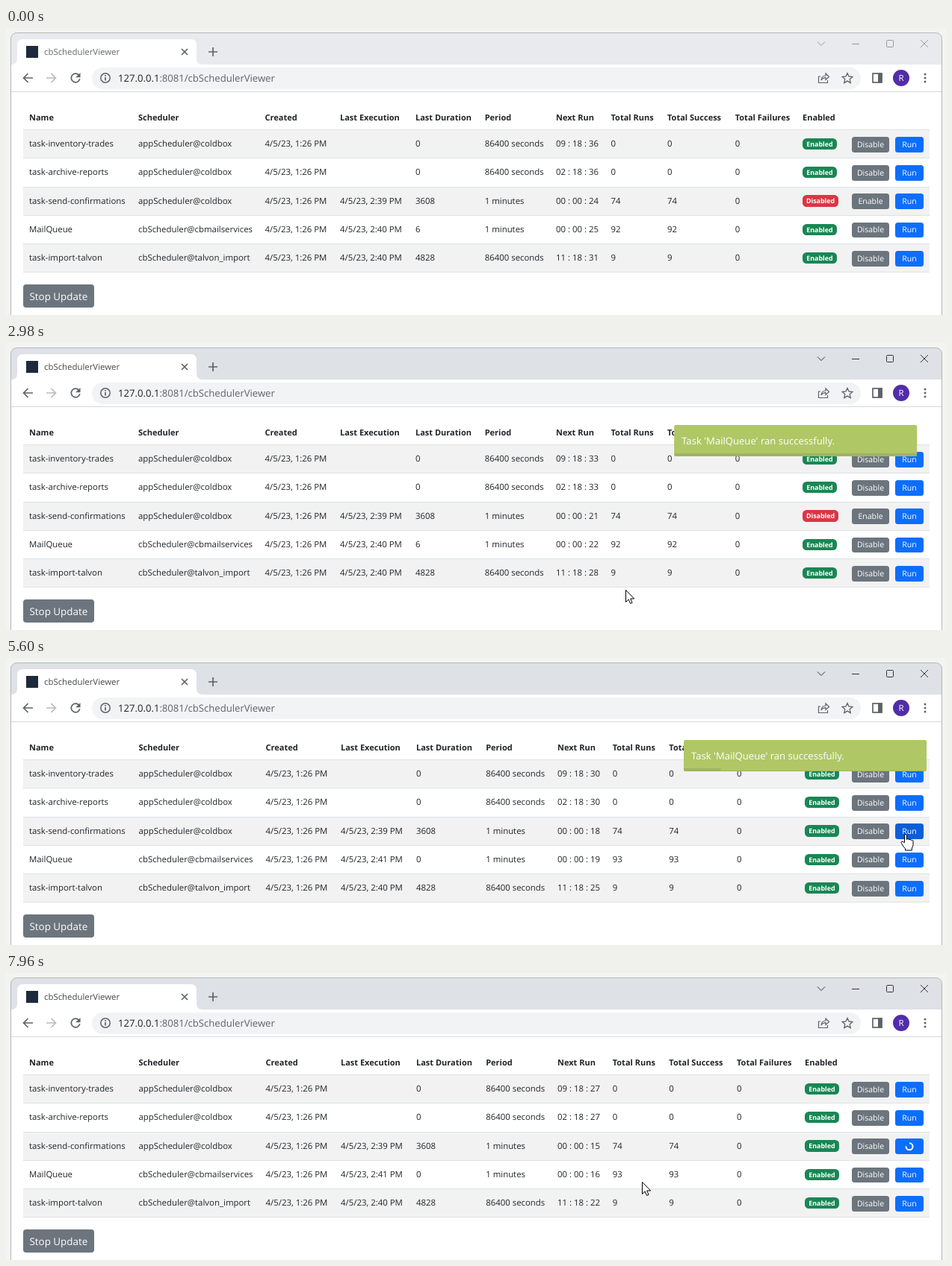
Write an HTML page that moves like this. It is 1258 px wide and 385 px high and loops after 8000 ms.

```html
<!DOCTYPE html>
<html lang="en">
<head>
<meta charset="utf-8">
<title>cbSchedulerViewer</title>
<style>
  html, body { margin: 0; width: 100%; height: 100%; overflow: hidden; background: #f3f3f1; }
  svg { display: block; }
  text { font: 11.4px "Open Sans", "Noto Sans", sans-serif; fill: #212529; white-space: pre; text-rendering: geometricPrecision; }
  .head { font-size: 11px; font-weight: 700; }
  .btn { font-size: 10.5px; fill: #fff; text-anchor: middle; }
  .badge { font-size: 8.9px; font-weight: 700; fill: #fff; text-anchor: middle; }
  .icon { fill: none; stroke: #5f6368; stroke-width: 1.7; }
  .thin { fill: none; stroke-width: 1; }
</style>
</head>
<body>
<svg width="1258" height="385" viewBox="0 0 1258 385">
  <defs><clipPath id="page"><rect x="7" y="86" width="1245" height="299"/></clipPath></defs>

  <rect id="win" x="6.5" y="6.5" width="1246" height="420" rx="8" stroke="#b5b6b8"/>
  <path d="M7 49q8 0 8-8V23q0-8 8-8H247q8 0 8 8V41q0 8 8 8Z" fill="#fff"/>
  <rect x="7" y="49" width="1245" height="336" fill="#fff"/>
  <rect x="27" y="24" width="16" height="16" fill="#1d2a3c"/>
  <text id="title" x="51" y="36">cbSchedulerViewer</text>
  <path class="icon" d="M235 28l8 8m0-8l-8 8" stroke-width="1.5"/>
  <path class="icon" d="M271 32h12m-6-6v12"/>
  <g id="controls" class="thin">
    <path d="M1086 18.500l5 5 5-5M1132 21.500h10M1224 16l10 10m0-10l-10 10"/>
    <rect x="1178.500" y="16.500" width="9" height="9" rx="1"/>
  </g>

  <path class="icon" d="M36 67H23.500m6-6l-6 6 6 6"/>
  <path class="icon" d="M54 67h12.500m-6-6l6 6-6 6" style="stroke:#b9bbbe"/>
  <path class="icon" d="M97.500 63.200a5.800 5.800 0 1 0 1.300 5"/>
  <path d="M99.500 60v6.300h-6.300z" fill="#5f6368"/>
  <rect x="115" y="53" width="1029" height="29" rx="14.500" fill="#f1f3f4"/>
  <circle class="icon" cx="133" cy="67" r="6.200" style="stroke-width:1.500"/>
  <path class="icon" d="M133 66v4.500M133 63v1.700"/>
  <text x="150" y="72" style="font-size:13.1px;fill:#5f6368"><tspan fill="#202124">127.0.0.1</tspan>:8081/cbSchedulerViewer</text>
  <path class="icon" style="stroke-width:1.200" d="M1090 65h-2.500v8.500h12V70M1091 70q.5-6 6-6v-3l4.500 4.500-4.500 4v-2.800q-4 0-6 3.300z"/>
  <path class="icon" style="stroke-width:1.300" d="M1126 60.500l2 4.500 4.800.5-3.600 3.300 1 4.800-4.200-2.500-4.200 2.500 1-4.800-3.600-3.300 4.800-.5z"/>
  <rect class="icon" x="1160" y="61" width="12" height="12"/>
  <rect x="1167" y="60.500" width="5.500" height="13" fill="#5f6368"/>
  <circle cx="1198" cy="67" r="11" fill="#512da8"/>
  <text x="1198" y="71" style="fill:#fff;text-anchor:middle">R</text>
  <g fill="#5f6368"><circle cx="1230" cy="62" r="1.500"/><circle cx="1230" cy="67" r="1.500"/><circle cx="1230" cy="72" r="1.500"/></g>
  <path d="M7 85.500H1252" stroke="#d6d8db"/>

  <g id="table"></g>
  <g id="spin" fill="none" stroke="#fff" stroke-width="2"><circle r="4.500" stroke-dasharray="21.200 7.070"/></g>
  <rect x="23" y="344" width="95" height="31" rx="4" fill="#6c757d"/>
  <text x="31.500" y="365" style="font-size:13.4px;fill:#fff">Stop Update</text>

  <g clip-path="url(#page)">
    <g id="toast">
      <rect y="110" width="325" height="42" rx="2" fill="#afc765"/>
      <path d="M1 151.500H324" stroke="#a0b55c"/>
      <rect id="bar" y="148" height="3" fill="#646464" opacity=".2"/>
      <text x="10" y="136" style="font-size:13.1px;fill:#fff">Task 'MailQueue' ran successfully.</text>
    </g>
  </g>

  <g id="cursor" fill="#fff" stroke="#000" stroke-linejoin="round">
    <path id="arrow" d="M.5.5V16.500L4.200 13l2.400 5.500 2.500-1.100L6.700 12h5z"/>
    <path id="hand" d="M-1.500 11.500V2q0-1.500 1.500-1.500T1.500 2V7.500Q1.700 6.500 3 6.500T4.500 8Q4.800 7.300 6 7.300T7.300 8.800Q7.600 8.300 8.500 8.300 10 8.300 10 10V14.500Q10 17 8.300 19V22H-.500V19.500Q-2.500 18-3.500 16L-5.600 12.500Q-6.500 11-5.200 10.300T-2.800 11.200Z"/>
  </g>
</svg>
<script>
const $ = id => document.getElementById(id);
const LOOP = 8000;

// bursts of screen updates: start, end, steps
const BURSTS = [
  [250, 990, 10], [1650, 1980, 5], [2150, 2900, 10], [2980, 3730, 10], [3810, 4550, 10],
  [4630, 5430, 11], [5510, 6240, 10], [6320, 6660, 5], [6830, 7560, 10], [7640, 7960, 5]
];
const TICKS = [740, 1730, 2640, 3550, 4630, 5430, 6320, 6650, 7640];
const PATH = [
  [250, 1203, 368], [600, 1186, 290], [900, 1155, 248], [1650, 1155, 248], [1950, 1208, 268],
  [2230, 1208, 268], [2700, 829, 331], [2980, 829, 331], [3640, 1088, 262], [3900, 1160, 238],
  [4720, 1160, 238], [5200, 1204, 236], [5600, 1204, 236], [5850, 1206, 269],
  [6200, 1209, 238], [6830, 1209, 238], [7300, 848, 286], [7500, 851, 280]
];
const ACTIVE = 2150, RAN = 2550, POLLED = 3550, ENABLED = 4630, RERUN = 6830;
const OPEN = 500, SHOWN = 3000;

const HEADS = ["Name", "Scheduler", "Created", "Last Execution", "Last Duration", "Period",
  "Next Run", "Total Runs", "Total Success", "Total Failures", "Enabled"];
const COLS = [31, 177, 346.5, 447, 548, 640.7, 736, 809.5, 885, 975.7, 1066];
const WIDER = [31, 177.5, 347.5, 448, 549, 642.2, 738, 811.7, 887.3, 978, 1069];
const RUN = { x: 1190, w: 38 }, TOGGLE = { x: 1132, w: 50 };
const BTN_TOP = 9.8, BTN_H = 20.8;

const rowY = i => 136 + 38.25 * i;
const text = (x, y, s, cls = "") => `<text x="${x}" y="${Math.round(y)}" class="${cls}">${s}</text>`;

// top and bottom edges fall on whole pixels
function box(x, y, w, h, r, fill) {
  const top = Math.round(y);
  return `<rect x="${x}" y="${top}" width="${w}" height="${Math.round(y + h) - top}" rx="${r}" fill="${fill}"/>`;
}

function snap(t) {
  let s = 0;
  for (const [a, b, n] of BURSTS) {
    if (t < a) break;
    const d = (b - a) / (n - 1);
    s = a + Math.min(n - 1, Math.floor((t - a) / d + 0.15)) * d;
  }
  return s;
}

// cubic-bezier(.68, -.55, .265, 1.55)
function backEase(p) {
  if (p <= 0) return 0;
  if (p >= 1) return 1;
  const curve = (s, a, b) => 3 * (1 - s) * (1 - s) * s * a + 3 * (1 - s) * s * s * b + s * s * s;
  let lo = 0, hi = 1;
  for (let i = 0; i < 24; i++) {
    const m = (lo + hi) / 2;
    if (curve(m, 0.68, 0.265) < p) lo = m; else hi = m;
  }
  return curve(lo, -0.55, 1.55);
}

function pointer(t) {
  const i = PATH.findIndex(k => k[0] > t);
  if (i < 0) return PATH[PATH.length - 1].slice(1);
  if (!i) return null;
  const [t0, x0, y0] = PATH[i - 1], [t1, x1, y1] = PATH[i];
  const p = (t - t0) / (t1 - t0), e = p * p * (3 - 2 * p);
  return [x0 + (x1 - x0) * e, y0 + (y1 - y0) * e];
}

function hit(pos) {
  if (!pos) return "";
  const [x, y] = pos;
  for (let i = 0; i < 5; i++) {
    const dy = y - rowY(i) - BTN_TOP;
    if (dy < 0 || dy > BTN_H) continue;
    if (x >= RUN.x && x <= RUN.x + RUN.w) return "run" + i;
    if (x >= TOGGLE.x && x <= TOGGLE.x + TOGGLE.w) return "toggle" + i;
  }
  return "";
}

function rows(k, polled) {
  const at = (h, m, s) => [h, m, String(s).padStart(2, "0")].join(" : ");
  const app = "appScheduler@coldbox", day = "86400 seconds", min = "1 minutes";
  const runs = polled ? 93 : 92;
  return [
    ["task-inventory-trades", app, "", 0, day, at("09", "18", 36 - k), 0],
    ["task-archive-reports", app, "", 0, day, at("02", "18", 36 - k), 0],
    ["task-send-confirmations", app, "4/5/23, 2:39 PM", 3608, min, at("00", "00", 24 - k), 74],
    ["MailQueue", "cbScheduler@cbmailservices", polled ? "4/5/23, 2:41 PM" : "4/5/23, 2:40 PM",
      polled ? 0 : 6, min, at("00", "00", k === 1 ? 23 : 25 - k), runs],
    ["task-import-talvon", "cbScheduler@talvon_import", "4/5/23, 2:40 PM", 4828, day, at("11", "18", 31 - k), 9]
  ];
}

function table(k, polled, enabled, over, busy) {
  const cols = enabled ? WIDER : COLS;
  let out = HEADS.map((h, c) => text(cols[c], 124, h, "head")).join("");
  rows(k, polled).forEach(([name, sched, last, dur, period, next, runs], i) => {
    const y = rowY(i), on = i !== 2 || enabled;
    if (i % 2 === 0) out += box(23, y, 1213, 38.25, 0, "#f2f2f2");
    [name, sched, "4/5/23, 1:26 PM", last, dur, period, next, runs, runs, 0]
      .forEach((s, c) => { out += text(cols[c], y + 23, s); });
    const w = on ? 46 : 48;
    out += box(cols[10], y + 11.8, w, 15.3, 5.5, on ? "#198754" : "#dc3545");
    out += text(cols[10] + w / 2, y + 22.8, on ? "Enabled" : "Disabled", "badge");
    out += box(TOGGLE.x, y + BTN_TOP, TOGGLE.w, BTN_H, 3.5, over === "toggle" + i ? "#5c636a" : "#6c757d");
    out += text(1157, y + 23.7, on ? "Disable" : "Enable", "btn");
    out += box(RUN.x, y + BTN_TOP, RUN.w, BTN_H, 3.5, over === "run" + i && busy !== i ? "#0b5ed7" : "#0d6efd");
    if (busy !== i) out += text(1209, y + 23.7, "Run", "btn");
  });
  for (let i = 0; i < 6; i++) out += box(23, rowY(i), 1213, 1, 0, "#dee2e6");
  return out;
}

let shown = "";
function draw(time) {
  const t = snap(time);
  const active = t >= ACTIVE, polled = t >= POLLED, enabled = t >= ENABLED;
  const k = TICKS.filter(x => x <= t).length;
  const pos = pointer(t), over = hit(pos);
  const busy = t >= RERUN ? 2 : t >= ACTIVE && t < RAN ? 3 : -1;

  const key = [k, polled, enabled, over, busy].join();
  if (key !== shown) {
    shown = key;
    $("table").innerHTML = table(k, polled, enabled, over, busy);
  }

  $("win").setAttribute("fill", active ? "#dee1e6" : "#e8eaed");
  $("title").style.fill = active ? "#45474a" : "#65686c";
  $("controls").setAttribute("stroke", active ? "#333" : "#999");

  $("spin").style.display = busy < 0 ? "none" : "";
  $("spin").setAttribute("transform", `translate(1209 ${rowY(busy) + 20.3}) rotate(${270 + (t - 7960) / 750 * 360})`);

  const closing = t - RAN - OPEN - SHOWN;
  const e = closing > 0 ? 1 - backEase(closing / OPEN) : backEase((t - RAN) / OPEN);
  const left = 1 - (t - RAN - OPEN) / SHOWN;
  $("toast").setAttribute("transform", `translate(${907 + 162.5 * (1 - e)} 0)`);
  $("toast").setAttribute("opacity", Math.max(0, Math.min(1, e)));
  $("bar").setAttribute("width", 325 * Math.max(0, Math.min(1, left)));

  $("cursor").style.display = pos ? "" : "none";
  if (pos) $("cursor").setAttribute("transform", `translate(${Math.round(pos[0])} ${Math.round(pos[1])})`);
  $("arrow").style.display = over ? "none" : "";
  $("hand").style.display = over ? "" : "none";
}

const start = performance.now();
function frame(now) {
  draw(Math.max(0, now - start) % LOOP);
  requestAnimationFrame(frame);
}
draw(0);
requestAnimationFrame(frame);
</script>
</body>
</html>
```
